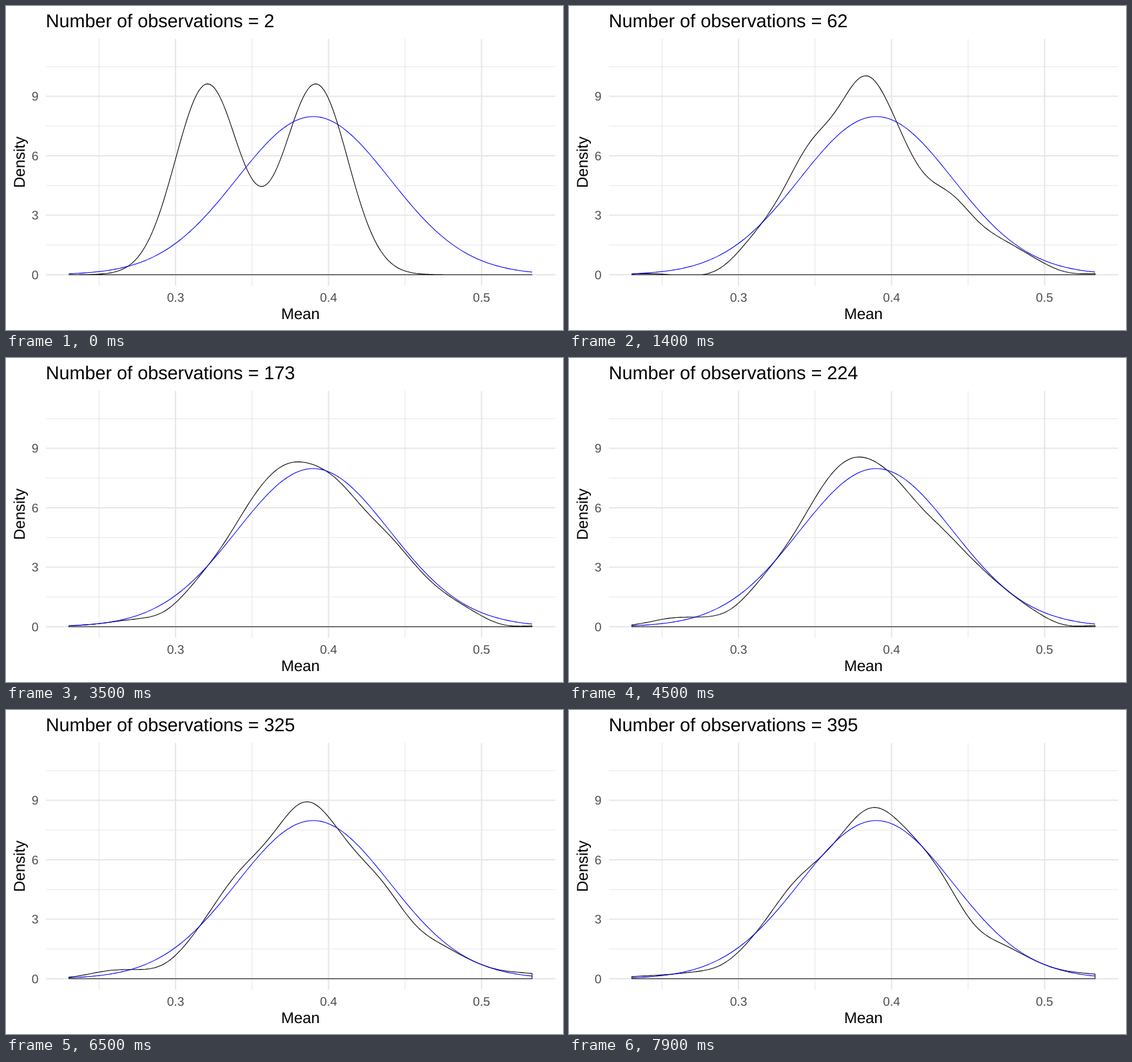
These frames come from a looping animation (864x504 px, 8 s). An HTML page:

```html
<!DOCTYPE html>
<html lang="en">
<head>
<meta charset="utf-8">
<title>Density of means</title>
<style>
  html, body { margin: 0; width: 864px; height: 504px; overflow: hidden; background: #fff; }
  svg { display: block; font-family: "Liberation Sans", Arial, Helvetica, sans-serif; text-rendering: geometricPrecision; }
  path { fill: none; stroke-width: 1.07; stroke-linejoin: round; }
  .tick { font-size: 19.2px; fill: #4d4d4d; }
  .axis { font-size: 24px; text-anchor: middle; }
</style>
</head>
<body>
<svg width="864" height="504" viewBox="0 0 864 504">
  <path id="minor" stroke="#e7e7e7"/>
  <path id="major" stroke="#e7e7e7" style="stroke-width:2.13"/>
  <path id="density" stroke="#000"/>
  <path id="normal" stroke="#00f"/>
  <g id="ticks" class="tick"></g>
  <text id="title" x="61.7" y="33" font-size="28.8"></text>
  <text class="axis" x="456.7" y="487">Mean</text>
  <text class="axis" transform="translate(29 243) rotate(-90)">Density</text>
</svg>
<script>
const $ = id => document.getElementById(id);
const X0 = 97.5, X1 = 816, BASE = 418, SAMPLES = 200;
const px = v => 263 + (v - 0.3) * 2373.5;
const py = v => BASE - v * 30.83;

const bell = (x, mid, sd, top) => top * Math.exp(-(((x - mid) / sd) ** 2) / 2);
const normal = x => bell(x, 476.6, 118.7, 246);
const twoPeaks = x => bell(x, 312.2, 49.3, 296) + bell(x, 480.8, 49.3, 296);
// Normal curve with a few bumps, each given as [x, height]
const bumpy = (...bumps) => x =>
  Math.max(0, bumps.reduce((h, [mid, top]) => h + bell(x, mid, 32, top), normal(x)));

// Key shapes of the estimate as it converges
const keys = [
  { tick: 0, n: 2, height: twoPeaks },
  { tick: 14, n: 62, height: bumpy([185, -8], [235, -18], [373, 35], [458, 66], [550, -45], [632, -17], [770, -7]) },
  { tick: 25, n: 123, height: bumpy([268, -20], [395, 9], [460, 52], [530, -18], [597, 6], [660, -9], [770, -8]) },
  { tick: 35, n: 173, height: bumpy([247, -13], [385, 16], [432, 17], [555, -14], [650, -5], [770, -8]) },
  { tick: 45, n: 224, height: bumpy([155, 7], [250, -13], [395, 19], [440, 21], [545, -20], [605, -7], [765, -9]) },
  { tick: 65, n: 325, height: bumpy([158, 6], [248, -14], [352, 14], [463, 31], [545, -14], [632, -17], [817, 4]) },
  { tick: 79, n: 395, height: bumpy([110, 2], [238, -10], [345, 14], [400, -6], [470, 21], [628, -24], [817, 3]) }
];

function curve(height) {
  let d = "";
  for (let i = 0; i <= SAMPLES; i++) {
    const x = X0 + (X1 - X0) * i / SAMPLES;
    d += (i ? "L" : "M") + x.toFixed(2) + " " + (BASE - height(x)).toFixed(2);
  }
  return d;
}

function grid(id, vs, hs) {
  $(id).setAttribute("d", vs.map(v => `M${px(v)} 51V435`).join("") + hs.map(v => `M62 ${py(v)}H852`).join(""));
}
grid("minor", [.25, .35, .45], [1.5, 4.5, 7.5, 10.5]);
grid("major", [.3, .4, .5], [0, 3, 6, 9]);
$("ticks").innerHTML =
  [.3, .4, .5].map(v => `<text x="${px(v)}" y="460" text-anchor="middle">${v}</text>`).join("") +
  [0, 3, 6, 9].map(v => `<text x="50.5" y="${py(v) + 6.7}" text-anchor="end">${v}</text>`).join("");
$("normal").setAttribute("d", curve(normal));

function draw(tick) {
  let i = 0;
  while (i < keys.length - 2 && tick >= keys[i + 1].tick) i++;
  const a = keys[i], b = keys[i + 1];
  const u = (tick - a.tick) / (b.tick - a.tick), n = a.n + (b.n - a.n) * u;
  // The sample accumulates, so counts rather than densities blend evenly
  const w = b.n * u / n;
  const line = curve(x => a.height(x) * (1 - w) + b.height(x) * w);
  $("density").setAttribute("d", line + `V${BASE}H${X0}Z`);
  $("title").textContent = "Number of observations = " + Math.floor(n);
}

const start = performance.now();
let shown = -1;
function loop() {
  const tick = Math.floor((performance.now() - start) / 100) % 80;
  if (tick !== shown) draw(shown = tick);
  requestAnimationFrame(loop);
}
loop();
</script>
</body>
</html>
```
